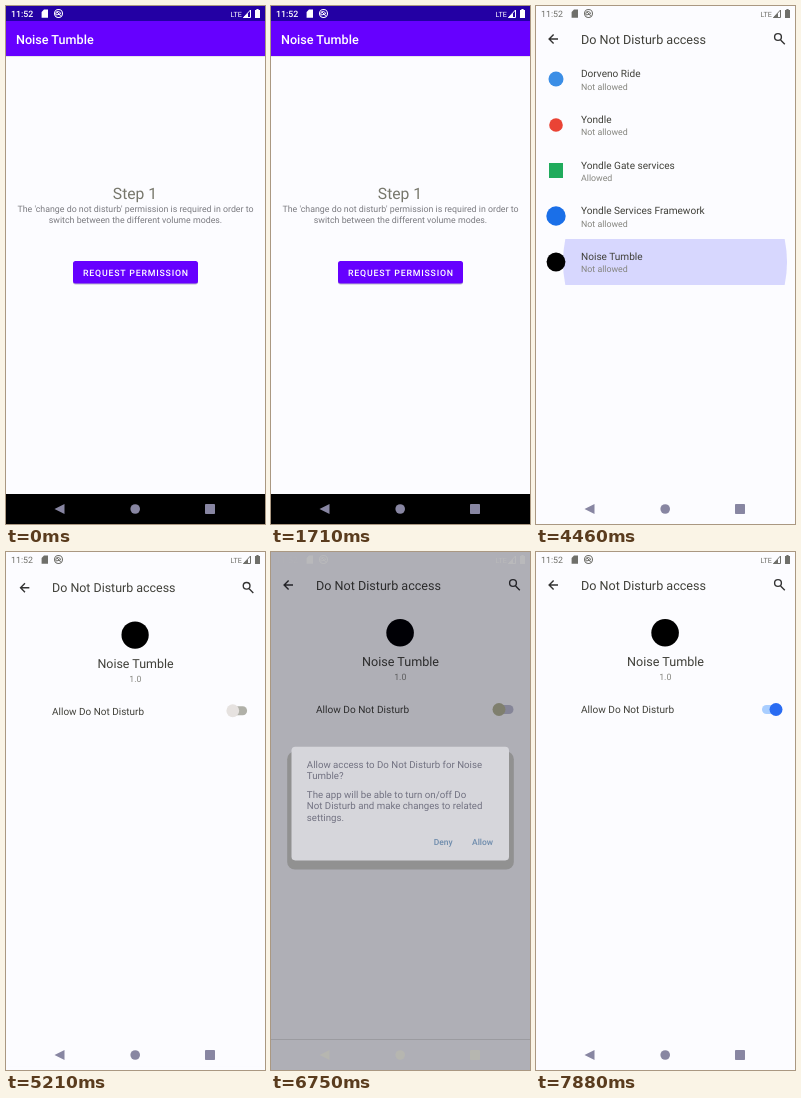
Write an HTML page that moves like this. It is 259x518 px and loops after 8 s.

```html
<!DOCTYPE html>
<html lang="en">
<head>
<meta charset="utf-8">
<title>Permission walkthrough</title>
<style>
html, body { margin: 0; width: 100%; height: 100%; overflow: hidden; background: #fcfcff; }
svg { display: block; }
#stage { width: 100%; height: 100%; font-family: Roboto, "Open Sans", sans-serif; text-rendering: geometricPrecision; }
.page { transform-origin: 129.5px 259px; }
.line { fill: none; stroke: #333; stroke-width: 1.4; }
#shadow { filter: blur(.8px); }
</style>
</head>
<body>
<svg id="stage" viewBox="0 0 259 518"></svg>
<script>
const LOOP = 8000, PAPER = '#fcfcff', INK = '#40403a', SOFT = '#85857f', PURPLE = '#6600ff';
const APP = 'Noise Tumble', ACCESS = 'Do Not Disturb access';

// Type sizes: 20, 16 and 14 sp at 0.63 px each
const BIG = 12.6, MID = 10.08, SMALL = 8.82;

const text = (x, y, size, str, fill = INK, extra = '') =>
  `<text x="${x}" y="${y}" font-size="${size}" fill="${fill}" ${extra}>${str}</text>`;
const rect = (x, y, w, h, fill, extra = '') =>
  `<rect x="${x}" y="${y}" width="${w}" height="${h}" fill="${fill}" ${extra}/>`;
const circle = (x, y, r, fill, extra = '') =>
  `<circle cx="${x}" cy="${y}" r="${r}" fill="${fill}" ${extra}/>`;
const group = (id, body, cls = '') => `<g id="${id}" class="${cls}">${body}</g>`;
const ripple = (id, y, h, cx) =>
  `<svg y="${y}" width="259" height="${h}">${circle(cx, h / 2, 0, '#d7d7fe', `id="${id}"`)}</svg>`;

const MIDDLE = 'text-anchor="middle"', BOLD = 'font-weight="500"';
const paper = rect(0, 0, 259, 518, PAPER);
const header = text(45, 37.5, BIG, ACCESS) +
  '<path class="line" d="M22 33H13.5M17.6 28.5L13.1 33l4.5 4.5M244.6 34l4.2 4.2"/>' +
  '<circle class="line" cx="242" cy="31" r="3.4"/>';

const apps = [
  ['Dorveno Ride', 'Not allowed', circle(20, 73, 7.5, '#3b8ee6')],
  ['Yondle', 'Not allowed', circle(20, 119, 6.8, '#ea4335')],
  ['Yondle Gate services', 'Allowed', rect(13, 157, 14, 15, '#20ab5c')],
  ['Yondle Services Framework', 'Not allowed', circle(20, 210, 9.7, '#1a6fe8')],
  [APP, 'Not allowed', circle(20, 256, 9.4, '#000')],
];
const rows = apps.map(([name, state, icon], i) =>
  icon + text(45, 71.3 + 45.7 * i, MID, name) + text(45, 83.5 + 45.7 * i, SMALL, state, SOFT)).join('');

const question = ['Allow access to Do Not Disturb for ' + APP.split(' ')[0], APP.split(' ')[1] + '?'];
const answer = ['The app will be able to turn on/off Do', 'Not Disturb and make changes to related', 'settings.'];
const lines = (list, y) => list.map((s, i) => text(32, y + 12 * i, MID, s, '#383850')).join('');

stage.innerHTML =
  group('intro', paper +
    rect(0, 50, 259, 1, '#e4e4ea') + rect(0, 15, 259, 35, PURPLE) + rect(0, 0, 259, 15, '#2300a4') +
    text(10, 37.7, BIG, APP, '#fff', BOLD) +
    text(129, 192.5, 15.7, 'Step 1', '#77776c', MIDDLE) +
    text(129.5, 206.3, SMALL, "The 'change do not disturb' permission is required in order to", '#7b7b80', MIDDLE) +
    text(129.5, 216.6, SMALL, 'switch between the different volume modes.', '#7b7b80', MIDDLE) +
    rect(67, 256, 125, 22.6, '#b9b9c8', 'rx="2.5"') + rect(67, 255, 125, 22.5, PURPLE, 'rx="2.5"') +
    `<svg x="67" y="255" width="125" height="22.5">${circle(62, 11, 0, '#fff', 'id="tap"')}</svg>` +
    text(77, 269.6, SMALL, 'REQUEST PERMISSION', '#fff', BOLD + ' letter-spacing=".0893em"'), 'page') +
  group('blank', paper + text(10, 37.5, BIG, ACCESS), 'page') +
  group('list', paper + header + group('rows', ripple('rowTap', 233, 46, 139) + rows), 'page') +
  group('detail', paper + header + ripple('allowTap', 141, 33, 134) +
    circle(129.1, 80.8, 13.8, '#000') +
    text(129.5, 114, BIG, APP, INK, MIDDLE) + text(129.3, 128, SMALL, '1.0', SOFT, MIDDLE) +
    text(45, 161.4, MID, 'Allow Do Not Disturb') +
    rect(226, 153, 16.5, 9, '#b0b0a8', 'rx="4.5" id="rail"') +
    circle(228, 157.5, 6.5, '#e6e2e0', 'id="thumb"'), 'page') +
  rect(0, 488, 259, 30, '#000', 'id="navBack"') +
  group('dim', rect(0, 0, 259, 518, '#000012', 'opacity=".6"') + rect(0, 487, 259, 1, '#000', 'opacity=".4"')) +
  group('dialog', rect(11.5, 197, 236, 123, '#1c1c00', 'rx="8" opacity=".4" id="shadow"') +
    rect(16, 192, 226.5, 118.5, PAPER, 'rx="4" id="sheet"') +
    lines(question, 214) + lines(answer, 245) +
    text(164, 294.5, SMALL, 'Deny', '#2f6aa4', BOLD) + text(204, 294.5, SMALL, 'Allow', '#2f6aa4', BOLD), 'page') +
  group('status', text(5, 10.8, SMALL, '11:52', 'currentColor', 'id="clock"') +
    '<path fill="currentColor" d="M38 3.4h4v8.3h-6.4V6z"/>' +
    '<circle cx="52.5" cy="7.5" r="4" fill="none" stroke="currentColor" stroke-width="1.1"/>' +
    '<path d="M50.2 9a2.3 2.3 0 1 1 4.2-1zM50.7 5.5l4 4.5" fill="none" stroke="currentColor"/>' +
    text(224.5, 10.6, 7.2, 'LTE', 'currentColor') +
    '<path d="M237.5 11.5l7-7.5v7.5z" fill="none" stroke="currentColor"/>' +
    '<path d="M237 12l5-5v5z" fill="currentColor"/>' +
    '<path d="M249 4h1.4V3h2.2v1h1.4v8h-5z" fill="currentColor"/>') +
  group('nav', '<path d="M58.5 498v10l-10-5z" fill="currentColor"/>' +
    circle(129.2, 503, 4.8, 'currentColor') + rect(199, 498, 10, 10, 'currentColor', 'rx=".8"'));

const el = id => document.getElementById(id);
const clamp = v => Math.max(0, Math.min(1, v));

// Linear track through [time, value] points
function track(t, ...pts) {
  if (t <= pts[0][0]) return pts[0][1];
  for (let i = 1; i < pts.length; i++) {
    const [a, u] = pts[i - 1], [b, v] = pts[i];
    if (t < b) return u + (v - u) * (t - a) / (b - a);
  }
  return pts[pts.length - 1][1];
}

function show(id, opacity, scale = 1) {
  const s = el(id).style;
  s.display = opacity > 0 ? '' : 'none';
  s.opacity = opacity;
  s.transform = scale === 1 ? '' : `scale(${scale})`;
}

// Window opening: the new page grows in while the old one swells
function opening(t, start, span) {
  const grow = 1 - (1 - clamp((t - start) / span)) ** 3;
  return { alpha: clamp((t - start - 35) / 130), enter: .85 + .15 * grow, leave: 1 + .1 * grow };
}

function spread(id, radius, opacity) {
  el(id).setAttribute('r', radius);
  el(id).setAttribute('opacity', opacity);
}

function draw(t) {
  const first = opening(t, 2150, 440), second = opening(t, 4940, 480);
  show('intro', first.alpha < 1 ? 1 : 0, first.leave);
  show('blank', t < 3250 ? first.alpha : 0, first.enter);
  show('list', second.alpha < 1 ? track(t, [3000, 0], [3250, 1]) : 0, second.leave);
  show('rows', track(t, [3200, 0], [3550, 1]));
  show('detail', second.alpha, second.enter);

  spread('tap', track(t, [1790, 10], [1960, 66]), track(t, [1789, 0], [1790, .24], [1980, .24], [2150, 0]));
  spread('rowTap', track(t, [4380, 50], [4460, 112], [4500, 113], [4560, 135]),
    track(t, [4379, 0], [4380, 1], [4580, 1], [4750, 0]));
  spread('allowTap', track(t, [6250, 30], [6460, 132], [6500, 133]),
    track(t, [6249, 0], [6250, 1], [6540, 1], [6740, 0]));

  const modal = track(t, [6640, 0], [6860, 1], [7629, 1], [7630, .72], [7710, .72], [7800, 0]);
  show('dim', modal);
  show('dialog', modal, track(t, [6640, .92], [6860, 1]));
  el('sheet').setAttribute('fill', t < 7630 ? PAPER : '#f5f5c0');

  const on = track(t, [7730, 0], [7870, 1]), dimmed = modal > .3;
  el('thumb').setAttribute('cx', 228 + 12 * on);
  el('thumb').setAttribute('fill', on > .3 ? '#2a6cf2' : dimmed ? '#b8b898' : '#e6e2e0');
  el('rail').setAttribute('fill', on > .3 ? '#a9ceff' : dimmed ? '#c0c0d4' : '#b0b0a8');

  const settings = t >= 2230;
  el('navBack').setAttribute('fill', settings ? 'none' : '#000');
  el('status').style.color = dimmed ? '#b9b9bb' : settings ? '#6f6f6a' : '#fff';
  el('clock').setAttribute('opacity', dimmed ? .2 : 1);
  el('clock').setAttribute('font-weight', settings ? 400 : 500);
  el('nav').style.color = dimmed ? '#b6b6b0' : '#8886a2';
}

const began = performance.now();
function tick() {
  draw((performance.now() - began) % LOOP);
  requestAnimationFrame(tick);
}
tick();
</script>
</body>
</html>
```
